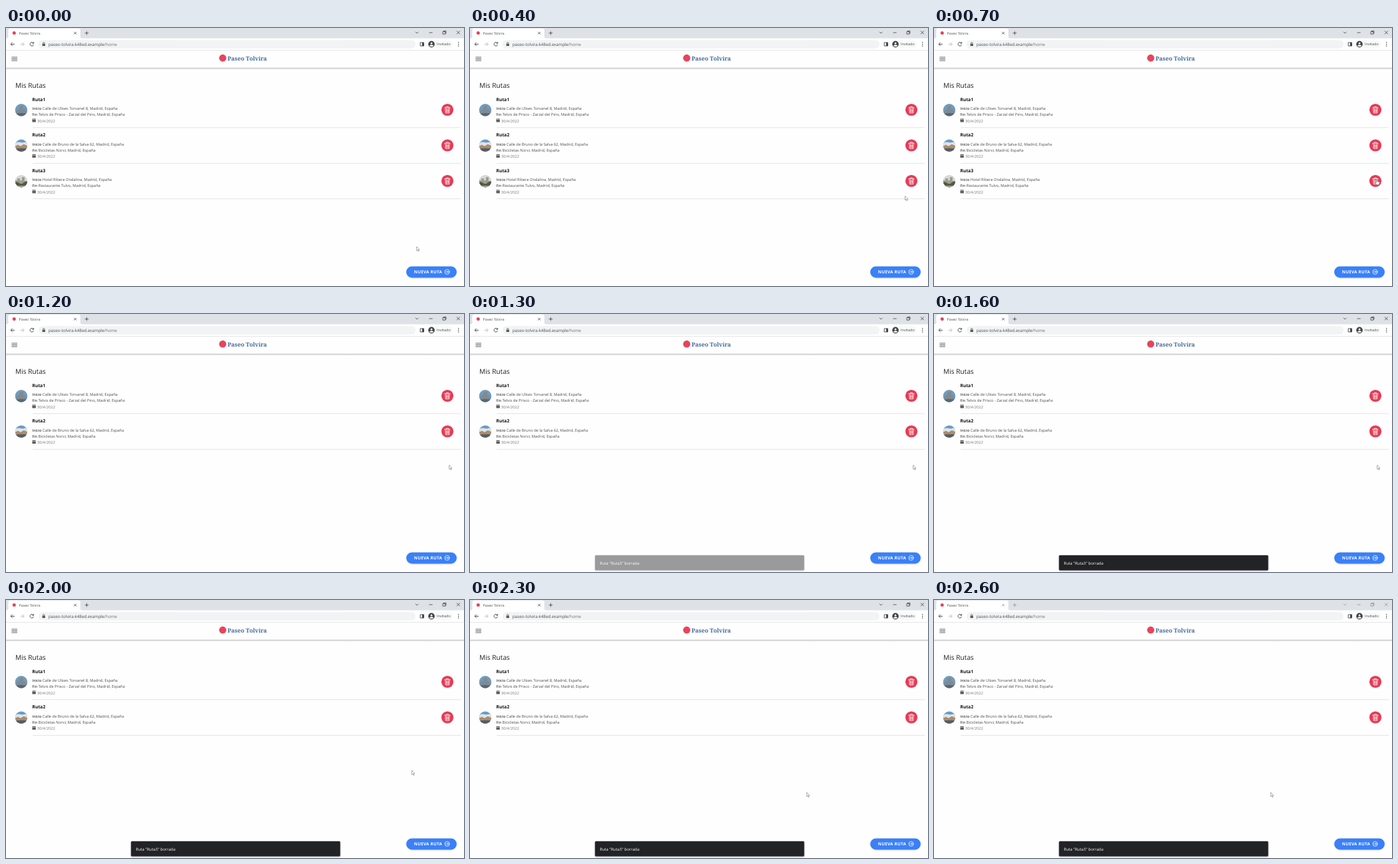
Animation of 690x388 px, one loop 2700 ms. Source, as an HTML page:

```html
<!DOCTYPE html>
<html lang="es">
<head>
<meta charset="utf-8">
<title>Mis Rutas</title>
<style>
html, body { margin: 0; width: 100%; height: 100%; overflow: hidden; background: #fefefe; }
svg { display: block; width: 100%; height: 100%; }
text { font: 5.8px "Open Sans", "Noto Sans", sans-serif; fill: #4c4c4c; text-rendering: geometricPrecision; white-space: pre; }
.line { fill: none; stroke: #3c4043; stroke-width: .9; }
.frame { stroke: #333; stroke-width: .75; }
.blurred .frame { stroke: #8b8e92; }
.white { fill: none; stroke: #fff; stroke-width: .8; stroke-linecap: round; stroke-linejoin: round; }
.label { font-size: 5.4px; font-weight: 600; fill: #444; }
</style>
</head>
<body>
<svg id="stage" viewBox="0 0 690 388" preserveAspectRatio="none">
  <defs>
    <linearGradient id="shade" x2="0" y2="1">
      <stop offset="0" stop-color="#c2c2c2"/><stop offset="1" stop-color="#c2c2c2" stop-opacity="0"/>
    </linearGradient>
    <filter id="soft" x="-10%" y="-40%" width="120%" height="200%"><feGaussianBlur stdDeviation="1.1"/></filter>
    <clipPath id="round"><circle r="9.2"/></clipPath>
    <g id="trash">
      <circle r="9.1" fill="#e43c57"/>
      <path class="white" d="M-4-3.2H4M-1.5-3.2V-4.6H1.5V-3.2M-3.2-3.2L-2.7 4.8H2.7L3.2-3.2M0-1.2V3.2M-1.5-1.2L-1.3 3.2M1.5-1.2L1.3 3.2"/>
    </g>
    <path id="calendar" fill="#5c5c5c" d="M0 1.6V1.2Q0 .6.6.6H1V0H1.7V.6H3.7V0H4.4V.6H4.8Q5.4.6 5.4 1.2V1.6ZM0 2.1H5.4V5Q5.4 5.6 4.8 5.6H.6Q0 5.6 0 5Z"/>
    <g id="photo1">
      <rect x="-10" y="-10" width="20" height="20" fill="#6f9cbe"/>
      <path d="M-10 10V3L-6 1V-1H-3V-5L0-7 3-5V-1H6V1L10 3V10Z" fill="#7f8b93"/>
      <path d="M-10 10V6Q0 3 10 6V10Z" fill="#566873"/>
    </g>
    <g id="photo2">
      <rect x="-10" y="-10" width="20" height="20" fill="#6a9bcb"/>
      <path d="M-10-3Q-6-6-2-5T5-5 10-3V3H-10Z" fill="#dfe4e6"/>
      <path d="M-10 1L-5-1-1 1 4-2 10 1V10H-10Z" fill="#b08a68"/>
      <path d="M-10 5Q0 3 10 5V10H-10Z" fill="#51606a"/>
    </g>
    <g id="photo3">
      <rect x="-10" y="-10" width="20" height="20" fill="#d5dad9"/>
      <path d="M-10 10V-1H-6V-4H-2V-1H1V-6H5V0H10V10Z" fill="#a39b8c"/>
      <path d="M-10 2Q-6 0-3 3T4 2 10 3V10H-10Z" fill="#515a48"/>
      <path d="M-6 7H6L4 9H-4Z" fill="#a9aaa0"/>
    </g>
  </defs>

  <g id="browser">
    <path d="M0 0H690V16H0Z" fill="#dee1e6"/>
    <path d="M0 15.5Q3.5 15.5 3.5 12.5V3.5Q3.5.8 6.5.8H109Q112 .8 112 3.5V12.5Q112 15.5 115 15.5H690V33.5H0Z" fill="#fff"/>
    <circle cx="12.3" cy="7.6" r="2.5" fill="#e5455a"/>
    <text x="19.6" y="9.5" style="font-size:5.25px">Paseo Tolvira</text>
    <path class="line frame" d="M102.5 5.9L106.1 9.5M106.1 5.9L102.5 9.5M118.8 7.6H124.4M121.6 4.8V10.4"/>
    <path class="line frame" d="M616.9 5.8L619.1 8 621.3 5.8M637.4 7H642.6M658 5.5H661.8V9.2H658ZM659.2 5.3V4.4H662.9V8H662M679 4.4L683.8 9.2M683.8 4.4L679 9.2"/>

    <path class="line" d="M13 24.4H7.2M9.9 21.6L7.1 24.4 9.9 27.2"/>
    <path class="line" style="stroke:#b9bbbe" d="M21.5 24.4H27.3M24.6 21.6L27.4 24.4 24.6 27.2"/>
    <path class="line" d="M41.2 22.6A2.8 2.8 0 1 0 41.6 25.2M41.7 21V23.2H39.4"/>
    <rect x="49" y="18.3" width="568" height="12.4" rx="6.2" fill="#f1f3f4"/>
    <path d="M54.7 23.7H59V27H54.7Z" fill="#55585c"/>
    <path class="line" style="stroke-width:.7" d="M55.6 23.8V22.9A1.25 1.25 0 0 1 58.1 22.9V23.8"/>
    <text x="64" y="26.6" style="font-size:6.25px">paseo-tolvira-k48ed.example<tspan fill="#6d7176">/home</tspan></text>
    <path class="line" d="M624.1 21.9H629.4V27H624.1Z"/>
    <path d="M627 21.9H629.4V27H627Z" fill="#3c4043"/>
    <rect x="635" y="18.6" width="38" height="11.8" rx="5.9" fill="#f8f9f9"/>
    <circle cx="641" cy="24.4" r="4.8" fill="#3c4043"/>
    <circle cx="641" cy="22.9" r="1.5" fill="#fff"/>
    <path d="M638 27Q638 25.2 641 25.2T644 27Q641 29.2 638 27Z" fill="#fff"/>
    <text x="649" y="26.3" style="font-size:5.5px">Invitado</text>
    <g fill="#3c4043"><circle cx="681.7" cy="21.8" r=".75"/><circle cx="681.7" cy="24.4" r=".75"/><circle cx="681.7" cy="27" r=".75"/></g>
    <path d="M0 33H690V33.7H0Z" fill="#dcdee0"/>
  </g>

  <path d="M0 59.8H690V62.8H0Z" fill="url(#shade)"/>
  <path class="line" style="stroke:#444" d="M8.4 44H17M8.4 46.5H17M8.4 49H17"/>
  <circle cx="326.5" cy="45.2" r="5.4" fill="#e5455a"/>
  <text x="333.8" y="48.6" style="font:600 8.7px 'Noto Serif',serif;fill:#41699e">Paseo Tolvira</text>
  <text x="14" y="90" style="font-size:10.2px;fill:#222">Mis Rutas</text>
  <g id="rows"></g>

  <rect x="604" y="360" width="74" height="16.5" rx="8.2" fill="#000" opacity=".16" filter="url(#soft)"/>
  <rect x="603" y="358.4" width="76" height="17" rx="8.5" fill="#3a80f7"/>
  <text x="614.8" y="369.3" style="font-size:6.3px;font-weight:700;letter-spacing:.25px;fill:#fff">NUEVA RUTA</text>
  <g class="white"><circle cx="664.6" cy="366.8" r="3.6"/><path d="M662.7 366.8H666.4M665 365.3L666.5 366.8 665 368.3"/></g>

  <g id="toast">
    <rect x="188.5" y="364" width="315" height="22.5" rx="1.5" fill="#000" opacity=".3" filter="url(#soft)"/>
    <rect x="188.3" y="362.8" width="315.2" height="22.7" rx="1.5" fill="#222326"/>
    <text x="195.5" y="377" style="font-size:6px;fill:#fff">Ruta "Ruta3" borrada</text>
  </g>

  <g id="pointer" fill="#fff" stroke="#666" stroke-width=".55" stroke-linejoin="round">
    <path id="arrow" d="M0 0V6.2L1.5 4.9 2.5 7.2 3.5 6.8 2.5 4.6H4.4Z"/>
    <path id="hand" d="M-1.4 1Q-1.4.3-.8.3T-.2 1V3.4L2.5 4Q3.6 4.3 3.5 5.3L2.9 8.4H-.9L-2.9 5.7Q-2.7 4.7-1.4 5.8Z"/>
  </g>
</svg>
<script>
const $ = id => document.getElementById(id);
const LOOP = 2700, STEP = 100;

const routes = [
  ["Calle de Ulises Torvanel 8", "Telvis de Prisco - Zarzal del Pino"],
  ["Calle de Bruno de la Salva 62", "Bicicletas Norvi"],
  ["Hotel Ribera Ondalina", "Restaurante Tulvo"]
];

const place = (label, name, y) =>
  `<text x="39.5" y="${y}"><tspan class="label">${label}</tspan> ${name}, Madrid, España</text>`;

$("rows").innerHTML = routes.map(([from, to], i) => `
  <g id="row${i + 1}" transform="translate(0 ${i * 53.5})">
    <text x="39.5" y="109.6" style="font-size:6.75px;font-weight:700;fill:#111">Ruta${i + 1}</text>
    <g transform="translate(23 123.2)" clip-path="url(#round)"><use href="#photo${i + 1}"/></g>
    ${place("Inicio", from, 123)}
    ${place("Fin", to, 132)}
    <use href="#calendar" x="39.5" y="136"/>
    <text x="47" y="141.7" style="font-size:5.7px;fill:#777">30/4/2022</text>
    <use href="#trash" x="665" y="123"/>
    <path d="M40 149.6H685V150.3H40Z" fill="#dcdcdc"/>
  </g>`).join("");

const part = (t, start, length) => Math.min(1, Math.max(0, (t - start) / length));
const easeOut = (x, power) => 1 - (1 - x) ** power;
const easeInOut = x => (1 - Math.cos(Math.PI * x)) / 2;
const show = (id, on) => $(id).setAttribute("display", on ? "inline" : "none");

function draw(now) {
  const t = Math.floor(now % LOOP / STEP) * STEP;
  const toBin = easeInOut(part(t, 0, 600));
  const away = part(t, 1900, 400);
  const x = 618.7 + 49 * toBin - 160.4 * easeOut(away, 1.5);
  const y = 328.8 - 101.5 * toBin + 62 * easeOut(away, 2.2);
  $("pointer").setAttribute("transform", `translate(${x} ${y})`);

  const overBin = t >= 700 && t < 1200;
  show("hand", overBin);
  show("arrow", !overBin);
  show("row3", t < 1200);
  $("toast").setAttribute("opacity", easeOut(part(t, 1262, 338), 5));
  $("browser").classList.toggle("blurred", t >= 2500);
  requestAnimationFrame(draw);
}
draw(0);
</script>
</body>
</html>
```
